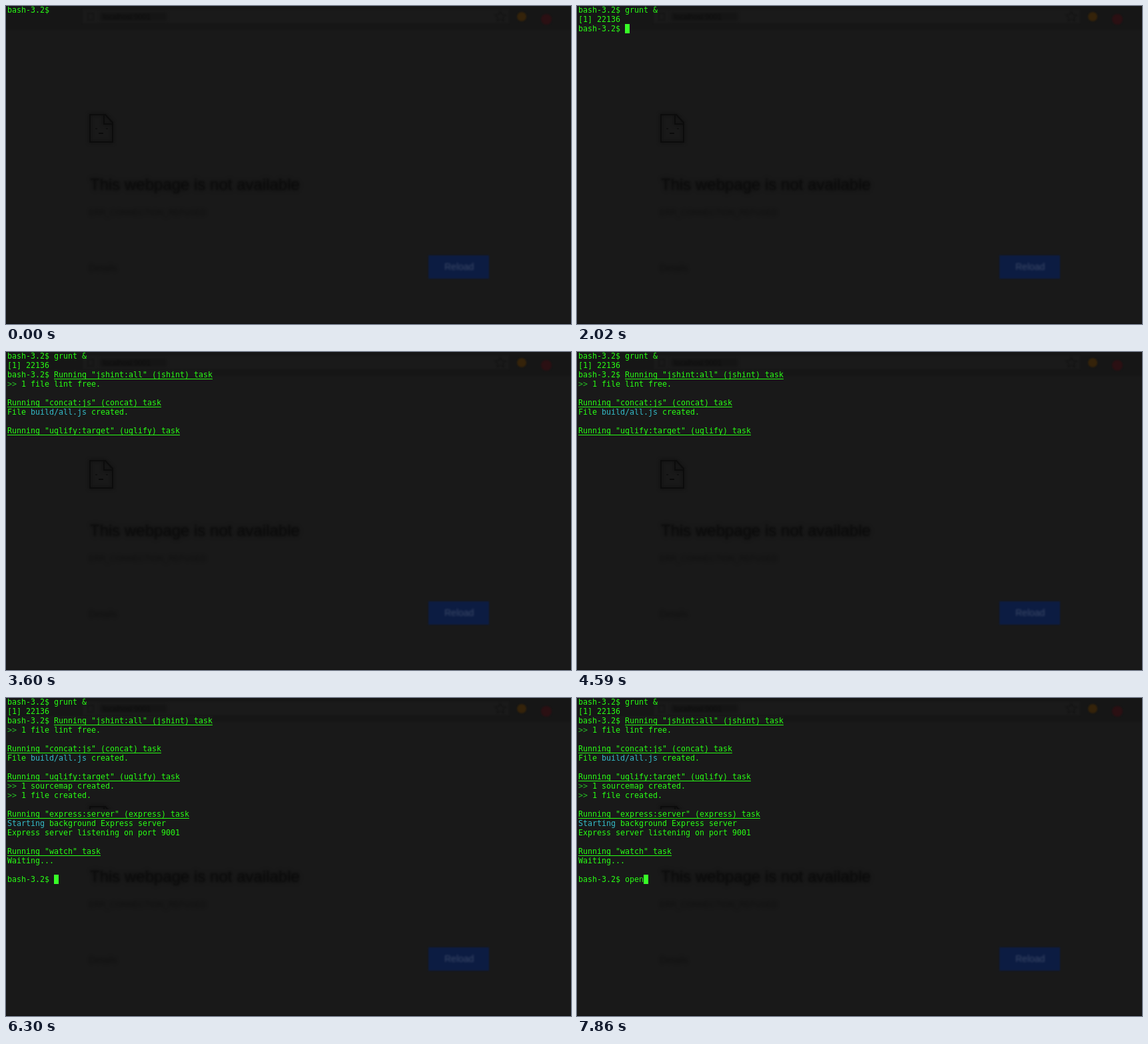
An HTML page with a canvas for the animation above (8 s loop, 848 by 477 pixels).

```html
<!DOCTYPE html>
<html lang="en">
<head>
<meta charset="utf-8">
<title>Terminal build</title>
<style>
  html, body { margin: 0; width: 100%; height: 100%; overflow: hidden; background: #191919; }
  canvas { display: block; width: 848px; height: 477px; }
</style>
</head>
<body>
<canvas id="stage" width="848" height="477"></canvas>
<script>
const W = 848, H = 477, LOOP = 8000;
const CELL_W = 7, CELL_H = 14, LEFT = 2;
const BG = '#191919', GREEN = '#28fe14', CURSOR = '#38fe27', DIM = '#25bc24', CYAN = '#33bbc8';
const SANS = '"Liberation Sans", Arial, sans-serif';
const MONO = '11.63px "DejaVu Sans Mono", monospace';
const PROMPT = 'bash-3.2$ ';

const ctx = document.getElementById('stage').getContext('2d');
const prints = [];
const cursors = [];

function print(time, row, col, text, color = GREEN, underline = false) {
  prints.push({ time, row, col, text, color, underline });
}
function header(time, row, text, col = 0) {
  print(time, row, col, `Running ${text} task`, GREEN, true);
}
function result(time, row, text) {
  print(time, row, 0, '>>', DIM);
  print(time, row, 3, text);
}
function cursor(time, row, col) {
  cursors.push({ time, row, col, on: true });
}
function hide(time) {
  cursors.push({ time, on: false });
}
function type(row, text, times) {
  times.forEach((time, i) => {
    print(time, row, 10 + i, text[i]);
    cursor(time, row, 11 + i);
  });
}

// Session script
print(0, 0, 0, PROMPT);
hide(0);
cursor(120, 0, 10);
hide(630);
type(0, 'grunt &', [740, 920, 980, 1160, 1280, 1340, 1700]);

print(2020, 1, 0, '[1] 22136');
print(2020, 2, 0, PROMPT);
cursor(2020, 2, 10);

header(2590, 2, '"jshint:all" (jshint)', 10);
result(2590, 3, '1 file lint free.');
cursor(2590, 4, 0);

header(2650, 5, '"concat:js" (concat)');
print(2650, 6, 0, 'File');
print(2650, 6, 5, 'build/all.js', CYAN);
print(2650, 6, 18, 'created.');
header(2650, 8, '"uglify:target" (uglify)');
cursor(2650, 9, 0);
hide(3600);
cursor(4080, 9, 0);
hide(4590);

result(5100, 9, '1 sourcemap created.');
result(5100, 10, '1 file created.');
header(5100, 12, '"express:server" (express)');
print(5100, 13, 0, 'Starting', CYAN);
print(5100, 13, 9, 'background Express server');
cursor(5100, 14, 0);

print(5400, 14, 0, 'Express server listening on port 9001');
header(5400, 16, '"watch"');
print(5400, 17, 0, 'Waiting...');
cursor(5400, 18, 0);

print(6300, 19, 0, PROMPT);
cursor(6300, 19, 10);
type(19, 'open', [7560, 7660, 7760, 7860]);

// Blurred browser page seen through the terminal
function makeBackdrop() {
  const layer = document.createElement('canvas');
  layer.width = W;
  layer.height = H;
  const c = layer.getContext('2d');

  const blur = px => { c.filter = px ? `blur(${px}px)` : 'none'; };
  const rect = (color, x, y, w, h) => { c.fillStyle = color; c.fillRect(x, y, w, h); };
  const label = (text, x, y, size, color) => {
    c.font = `${size}px ${SANS}`;
    c.fillStyle = color;
    c.fillText(text, x, y);
  };
  const disc = (color, x, y, r) => {
    c.fillStyle = color;
    c.beginPath();
    c.arc(x, y, r, 0, Math.PI * 2);
    c.fill();
  };

  rect(BG, 0, 0, W, H);
  blur(1.2);
  rect('#161616', -4, -4, W + 8, 39);
  rect('#1a1a1a', 115, 5, 640, 21);

  blur(2);
  rect('#151515', 141, 10, 100, 12);
  blur(1);
  label('localhost:9001', 146, 20, 11, 'rgba(0,0,0,.4)');
  c.strokeStyle = '#141414';
  c.lineWidth = 1.5;
  c.strokeRect(123, 11, 8, 10);
  c.beginPath();
  for (let i = 0; i < 10; i++) {
    const a = -Math.PI / 2 + i * Math.PI / 5, r = i % 2 ? 4 : 8;
    c.lineTo(742 + r * Math.cos(a), 16 + r * Math.sin(a));
  }
  c.closePath();
  c.stroke();
  disc('#35230a', 774, 16, 7);
  disc('#2b1013', 811, 20, 8);

  // Page icon
  const outline = () => {
    c.beginPath();
    c.moveTo(126, 163);
    c.lineTo(149, 163);
    c.lineTo(160, 175);
    c.lineTo(160, 204);
    c.lineTo(126, 204);
    c.closePath();
    c.moveTo(147, 163);
    c.lineTo(147, 177);
    c.lineTo(160, 177);
    c.stroke();
  };
  blur(2);
  c.strokeStyle = '#121212';
  c.lineWidth = 4;
  outline();
  blur(0.6);
  c.strokeStyle = '#0c0c0c';
  c.lineWidth = 2;
  outline();
  rect('#0f0f0f', 134, 183, 3, 2);
  rect('#0f0f0f', 150, 183, 3, 2);
  rect('#0b0b0b', 139, 190, 7, 2);

  const title = 'This webpage is not available';
  blur(3);
  label(title, 126, 276, 24, 'rgba(0,0,0,.6)');
  blur(1);
  label(title, 126, 276, 24, 'rgba(0,0,0,.38)');
  blur(2);
  label('ERR_CONNECTION_REFUSED', 124, 314, 12, 'rgba(0,0,0,.36)');
  label('Details', 124, 398, 14, 'rgba(0,0,0,.36)');

  blur(1);
  rect('#0c1c42', 634, 374, 91, 35);
  blur(1.6);
  label('Reload', 658, 396, 14, 'rgba(130,140,160,.4)');
  blur(0);
  rect('#121212', 0, H - 1, W, 1);
  return layer;
}

const backdrop = makeBackdrop();

function drawPrint(p) {
  const x = LEFT + p.col * CELL_W, y = p.row * CELL_H, width = p.text.length * CELL_W;
  if (p.row > 1) {
    ctx.fillStyle = BG;
    ctx.fillRect(x, y - 1, width, CELL_H);
  }
  ctx.fillStyle = p.color;
  [...p.text].forEach((ch, i) => ctx.fillText(ch, x + i * CELL_W, y + 10));
  if (p.underline) ctx.fillRect(x, y + 12, width, 1);
}

function draw(t) {
  ctx.drawImage(backdrop, 0, 0);
  ctx.font = MONO;
  prints.filter(p => p.time <= t).forEach(drawPrint);
  const cur = cursors.filter(k => k.time <= t).pop();
  if (cur.on) {
    ctx.fillStyle = CURSOR;
    ctx.fillRect(LEFT + cur.col * CELL_W, cur.row * CELL_H - 1, CELL_W, CELL_H);
  }
}

let start;
function tick(now) {
  start ??= now;
  draw(Math.max(0, now - start) % LOOP);
  requestAnimationFrame(tick);
}
draw(0);
requestAnimationFrame(tick);
</script>
</body>
</html>
```
